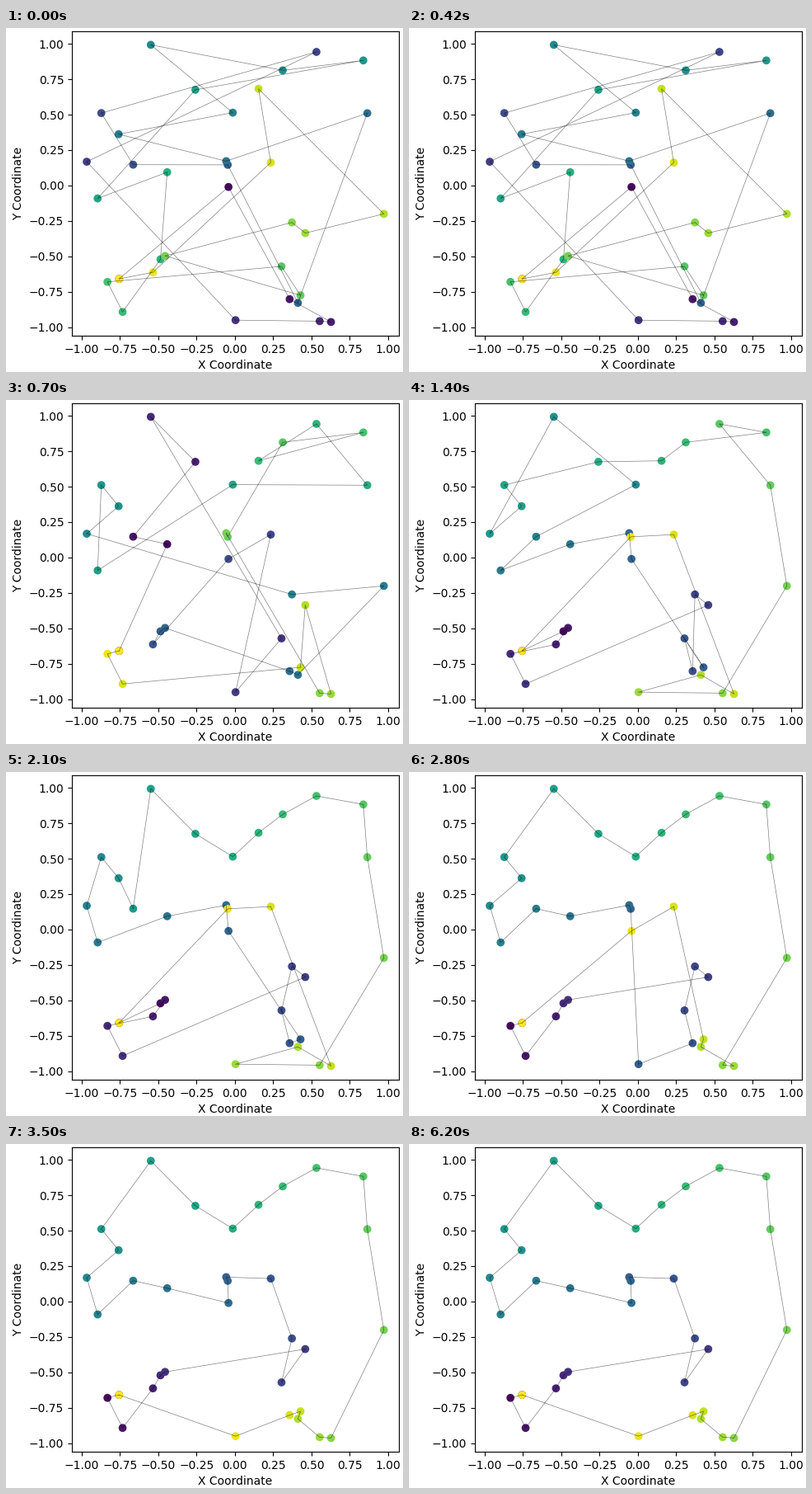
Animation of 482x417 px, one loop 8 s. Source, as a matplotlib script:

```python
import numpy as np
import matplotlib.pyplot as plt
from matplotlib.animation import FuncAnimation

W, H, DPI = 482, 417, 100
STEP_MS, HOLD, FRAMES = 100, 7, 80

CITIES = {
    "A": (-0.549, 0.992), "B": (0.532, 0.942), "C": (0.838, 0.882),
    "D": (0.312, 0.812), "E": (-0.258, 0.675), "F": (0.154, 0.682),
    "G": (-0.872, 0.511), "H": (-0.014, 0.514), "I": (0.864, 0.510),
    "J": (-0.759, 0.362), "K": (-0.967, 0.168), "L": (-0.664, 0.147),
    "M": (-0.057, 0.172), "N": (-0.047, 0.146), "O": (0.234, 0.162),
    "P": (-0.442, 0.094), "Q": (-0.896, -0.091), "R": (-0.042, -0.010),
    "S": (0.972, -0.200), "T": (0.372, -0.260), "U": (0.459, -0.335),
    "V": (-0.456, -0.496), "W": (-0.486, -0.520), "X": (-0.535, -0.612),
    "Y": (-0.756, -0.658), "Z": (-0.832, -0.679), "a": (-0.733, -0.891),
    "b": (0.304, -0.570), "c": (0.428, -0.774), "d": (0.357, -0.801),
    "e": (0.411, -0.827), "f": (0.004, -0.949), "g": (0.553, -0.956),
    "h": (0.627, -0.962),
}

# Closed routes from Y, each shorter than the one before
TOURS = [
    "YRdhgfKBGLNeIMJHADCEQPWaZbcVTUSFOXY",
    "YPLEAbfORXWVdeSTKJGQHIBFCDNMghUcaZY",
    "YWVXZaUTdbcRMPQLHAKJGEFDCBISgfehONY",
    "YWVXZaUTbdcRMPQKGJLAEHFDBCISgfehONY",
    "YZaXWVUTbdfNMPLQKJGAEHFDBCISghecORY",
    "YZaXWVUbTOMNRPLQKJGAEHFDBCIShgecdfY",
]
paths = [np.array([CITIES[c] for c in tour]) for tour in TOURS]

fig = plt.figure(figsize=(W / DPI, H / DPI), dpi=DPI)
ax = fig.add_axes([80 / W, 43.8 / H, 396.8 / W, 369.6 / H])
ax.set_xlabel("X Coordinate")
ax.set_ylabel("Y Coordinate")

x, y = paths[0].T
dots = ax.scatter(x, y, c=np.arange(len(x)), cmap="viridis")
route, = ax.plot(x, y, color="black", lw=0.5, alpha=0.5)


def update(i):
    path = paths[min(i // HOLD, len(paths) - 1)]
    dots.set_offsets(path)
    route.set_data(*path.T)
    return dots, route


anim = FuncAnimation(fig, update, frames=FRAMES, interval=STEP_MS, repeat=True)
plt.show()
```
